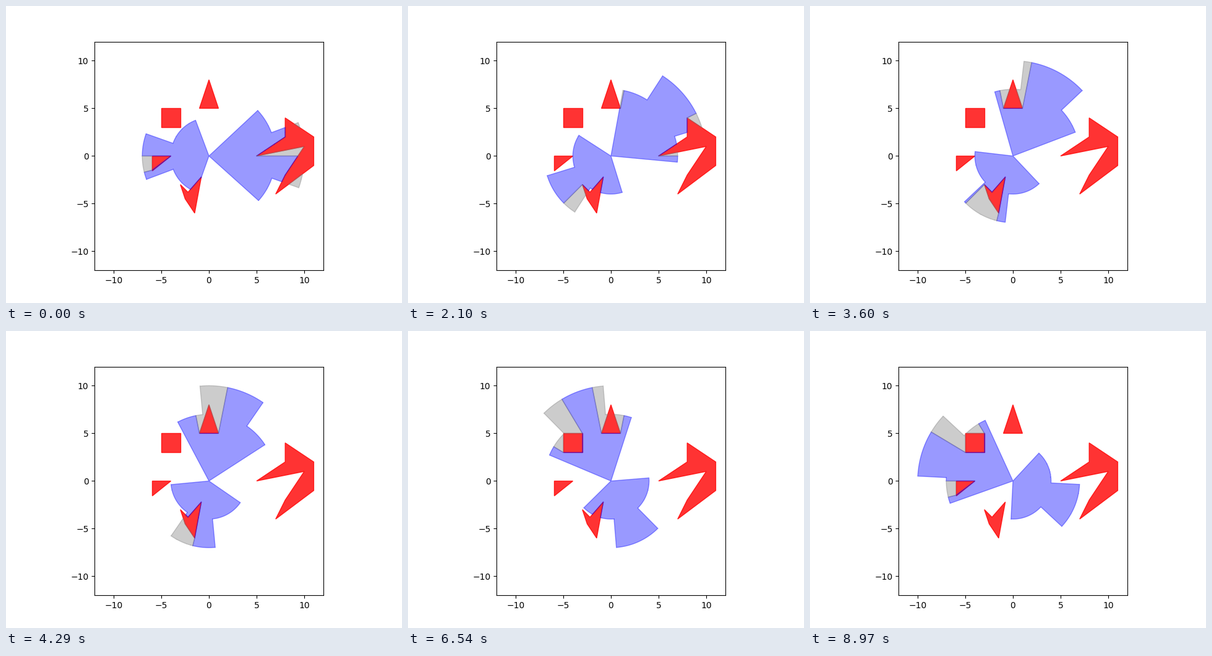
Animation of 640x480 px, one loop 9000 ms. Source, as a matplotlib script:

```python
import numpy as np
import matplotlib.pyplot as plt
from matplotlib.animation import FuncAnimation
from matplotlib.patches import PathPatch, Polygon
from matplotlib.path import Path

FRAMES, INTERVAL = 300, 30
TAU = 2 * np.pi
TURN = np.radians(np.pi / 6)  # heading change per frame

OBSTACLES = [
    [(0, 8), (-1, 5), (1, 5)],
    [(-5, 3), (-3, 3), (-3, 5), (-5, 5)],
    [(-4, 0), (-6, 0), (-6, -1.5)],
    [(-3, -3), (-2.2, -3.8), (-0.8, -2.2), (-1.5, -6), (-2.5, -4.5)],
    [(5, 0), (8, 2), (8, 4), (11, 2), (11, -1), (7, -4), (8, -2), (10, 1)],
]

# Each sensor: direction, then (half angle, range) from narrow to wide
SENSORS = [
    (0, [(20, 10), (42.5, 7)]),
    (180, [(20, 7), (70, 4)]),
]

P = np.array([p for ob in OBSTACLES for p in ob], float)
Q = np.array([q for ob in OBSTACLES for q in ob[1:] + ob[:1]], float)
D = Q - P
ANG = np.arctan2(P[:, 1], P[:, 0])
SPAN = (np.arctan2(Q[:, 1], Q[:, 0]) - ANG + np.pi) % TAU - np.pi
CROSS = P[:, 0] * D[:, 1] - P[:, 1] * D[:, 0]


def edge_dist(k, theta):
    """Distance from the origin to edge line k along theta."""
    return CROSS[k] / (np.cos(theta) * D[k, 1] - np.sin(theta) * D[k, 0])


def hits(theta):
    """Edges crossed by the ray at theta, as sorted (distance, edge)."""
    off = (theta - ANG + np.pi) % TAU - np.pi
    ks = np.flatnonzero((off * SPAN > 0) & (np.abs(off) < np.abs(SPAN)))
    return sorted((edge_dist(k, theta), k) for k in ks)


def range_crossings():
    """Angles where obstacle edges meet the range circles."""
    out = []
    for p, d in zip(P, D):
        for r in (4, 7, 10):
            a, b, c = d @ d, 2 * p @ d, p @ p - r * r
            disc = b * b - 4 * a * c
            if disc <= 0:
                continue
            for s in (-1, 1):
                u = (-b + s * np.sqrt(disc)) / (2 * a)
                if 0 <= u <= 1:
                    x, y = p + u * d
                    out.append(np.arctan2(y, x))
    return out


CRITICAL = np.concatenate([ANG, range_crossings()])


def polar(r, theta):
    return np.column_stack([r * np.cos(theta), r * np.sin(theta)])


class Region:
    """Collects cells, and the outline left after joining them."""

    def __init__(self):
        self.cells, self.lines = [], []

    def add(self, near, far, theta):
        lower, upper = polar(near, theta), polar(far, theta)
        self.cells.append(np.vstack([lower, upper[::-1], lower[:1]]))
        self.lines.append(upper)
        if near.any():
            self.lines.append(lower)

    def add_sides(self, left, right, theta):
        ends = sorted(left + right)
        for a, b in zip(ends[::2], ends[1::2]):
            if b - a > 1e-6:
                self.lines.append(polar(np.array([a, b]), theta))

    def paths(self):
        return join(self.cells), join(self.lines)


def join(parts):
    if not parts:
        return Path(np.zeros((1, 2)))
    return Path.make_compound_path(*[Path(p) for p in parts])


def scan(heading):
    """Visible and hidden regions of all sensors."""
    regions = Region(), Region()
    for direction, zones in SENSORS:
        axis = heading + np.radians(direction)
        halves = np.radians([h for h, _ in zones])
        lo, hi = axis - halves[-1], axis + halves[-1]
        inner = lo + (CRITICAL - lo) % TAU
        stops = np.sort(np.concatenate(
            [axis - halves, axis + halves, inner[inner < hi]]))
        stops = stops[np.append(True, np.diff(stops) > 1e-8)]

        before = [[], []]
        for a, b in zip(stops[:-1], stops[1:]):
            mid = (a + b) / 2
            reach = next(r for h, (_, r) in zip(halves, zones)
                         if abs(mid - axis) < h)
            theta = np.linspace(a, b, int((b - a) / 0.02) + 2)
            bounds = [0 * theta]
            bounds += [edge_dist(k, theta) for d, k in hits(mid) if d < reach]
            if len(bounds) % 2:
                bounds.append(np.full_like(theta, reach))

            start, end = [[], []], [[], []]
            for i in range(0, len(bounds), 2):
                near, far = bounds[i:i + 2]
                which = int(i > 0)
                regions[which].add(near, far, theta)
                start[which] += [near[0], far[0]]
                end[which] += [near[-1], far[-1]]
            for reg, left, right in zip(regions, before, start):
                reg.add_sides(left, right, a)
            before = end
        for reg, left in zip(regions, before):
            reg.add_sides(left, [], hi)
    return regions


fig, ax = plt.subplots(figsize=(6.4, 4.8), dpi=100)
ax.set_xlim(-12, 12)
ax.set_ylim(-12, 12)
ax.set_aspect("equal")

for ob in OBSTACLES:
    ax.add_patch(Polygon(ob, closed=True, color="red", alpha=0.8))


def make_layer(color):
    empty = Path(np.zeros((1, 2)))
    fill = PathPatch(empty, fc=color, ec="none", lw=0, alpha=0.4)
    line = PathPatch(empty, fill=False, ec=color, lw=1, alpha=0.4,
                     capstyle="round")
    return ax.add_patch(fill), ax.add_patch(line)


layers = [make_layer("blue"), make_layer("gray")]


def update(i):
    for region, layer in zip(scan((i + 1) * TURN), layers):
        for path, patch in zip(region.paths(), layer):
            patch.set_path(path)
    return [patch for layer in layers for patch in layer]


anim = FuncAnimation(fig, update, frames=FRAMES, interval=INTERVAL,
                     repeat=True, repeat_delay=0)
plt.show()
```
